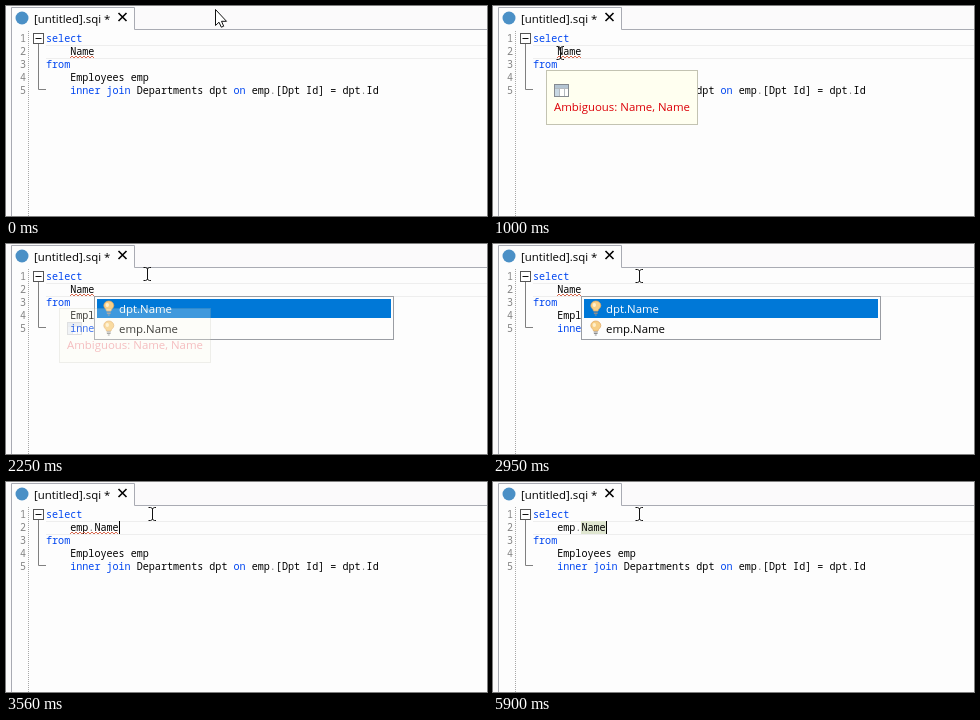
Write an HTML page that moves like this. It is 481 px wide and 210 px high and loops after 6.2 s.

```html
<!DOCTYPE html>
<html lang="en">
<head>
<meta charset="utf-8">
<title>Resolving an ambiguous column</title>
<style>
html, body { margin: 0; width: 100%; height: 100%; overflow: hidden; background: #fdfdfd; }
svg { display: block; width: 481px; height: 210px; }
text { white-space: pre; }
.code { font: 500 10.08px "Noto Sans Mono", "DejaVu Sans Mono", monospace; fill: #000; }
.ui { font: 11.41px "Open Sans", "Noto Sans", sans-serif; fill: #000; }
.kw { fill: #0046f0; }
.op { fill: #777; }
.num { fill: #858585; }
.wave { fill: none; stroke: #d2583c; stroke-width: .9; }

.anim { animation: 6200ms step-end infinite; }
#before { animation-name: before; }
#after { animation-name: after; }
#afterWave { animation-name: afterWave; }
#mark { animation-name: mark; }
#caretOld { animation-name: caretOld; }
#caretNew { animation-name: caretNew; }
#menu { animation-name: menu; }
#first { animation-name: first; }
#second { animation-name: second; }
#tip { animation-name: tip; }
#arrow { animation-name: arrow; }
#beam { stroke: #111; animation-name: beam, beamColor; }

@keyframes before { 0% { opacity: 1 } 57.41%, 100% { opacity: 0 } }
@keyframes after { 0% { opacity: 0 } 57.41%, 100% { opacity: 1 } }
@keyframes afterWave { 0% { opacity: 1 } 61.12%, 100% { opacity: 0 } }
@keyframes mark { 0% { opacity: 0 } 61.12%, 100% { opacity: 1 } }
@keyframes caretOld {
  0%, 12.41%, 29.83%, 47.58%, 57.41%, 100% { opacity: 0 }
  3.7%, 20.96%, 38.7%, 54.99% { opacity: 1 }
}
@keyframes caretNew {
  0%, 69.99%, 86.29% { opacity: 0 }
  57.41%, 78.87%, 95.16%, 100% { opacity: 1 }
}
@keyframes menu { 0%, 57.41%, 100% { opacity: 0 } 34.83% { opacity: 1 } }
@keyframes first { 0% { opacity: 1 } 51.29%, 100% { opacity: 0 } }
@keyframes second { 0% { opacity: 0 } 51.29%, 100% { opacity: 1 } }
@keyframes tip {
  0% { opacity: 0; transform: translate(59px, 57px) }
  13.54% { opacity: 1; transform: translate(59px, 57px) }
  14.83% { opacity: 1; transform: translate(53px, 64px) }
  33.54% { opacity: .8; transform: translate(53px, 64px) }
  34.83% { opacity: .5; transform: translate(53px, 64px) }
  36.29% { opacity: .25; transform: translate(53px, 64px) }
  37.41% { opacity: .1; transform: translate(53px, 64px) }
  38.7%, 100% { opacity: 0; transform: translate(53px, 64px) }
}
@keyframes arrow {
  0% { opacity: 1; transform: translate(209px, 3px) }
  9.83% { opacity: 1; transform: translate(194px, 8px) }
  11.12%, 100% { opacity: 0; transform: translate(194px, 8px) }
}
@keyframes beam {
  0% { opacity: 0; transform: translate(134px, 30px) }
  11.12% { opacity: 1; transform: translate(134px, 30px) }
  12.41% { opacity: 1; transform: translate(78px, 42px) }
  13.54% { opacity: 1; transform: translate(54px, 47px) }
  14.83% { opacity: 1; transform: translate(59px, 47px) }
  16.12% { opacity: 1; transform: translate(67px, 47px) }
  17.41% { opacity: 1; transform: translate(75px, 48px) }
  18.54% { opacity: 1; transform: translate(79px, 48px) }
  19.83% { opacity: 1; transform: translate(80px, 48px) }
  28.7% { opacity: 1; transform: translate(81px, 47px) }
  29.83% { opacity: 1; transform: translate(81px, 46px) }
  33.54% { opacity: 1; transform: translate(100px, 41px) }
  34.83% { opacity: 1; transform: translate(126px, 33px) }
  36.29% { opacity: 1; transform: translate(141px, 30px) }
  37.41% { opacity: 1; transform: translate(145px, 31px) }
  38.7% { opacity: 1; transform: translate(146px, 31px) }
  41.12%, 100% { opacity: 1; transform: translate(146px, 32px) }
}
@keyframes beamColor { 0%, 14.83%, 100% { stroke: #111 } 13.54% { stroke: #d8101c } }
</style>
</head>
<body>
<svg viewBox="0 0 481 210" xmlns="http://www.w3.org/2000/svg">
  <defs>
    <g id="bulb">
      <path d="M3.5 10C3.5 8 .8 7.2 .8 4.6A5 4.6 0 0 1 10.800 4.600C10.800 7.200 8 8 8 10Z" fill="#f8cf86" stroke="#dfa660" stroke-width=".7"/>
      <ellipse cx="4.3" cy="4" rx="1.7" ry="2.1" fill="#fff0cc"/>
      <path d="M3.7 11H7.8M3.9 12.5H7.6M4.8 14H6.7" stroke="#8d8d8d"/>
    </g>
  </defs>

  <!-- tab strip and editor frame -->
  <rect width="481" height="24" fill="#fbfafb"/>
  <rect width="5" height="210" fill="#fbfafb"/>
  <rect x="6" y="2" width="122" height="208" fill="#fdfdfd"/>
  <path d="M5.5 210V1.5H128.5V23.5H481" fill="none" stroke="#a9abb3"/>
  <circle cx="16" cy="12" r="6.5" fill="#4b90c6"/>
  <text class="ui" x="28" y="17">[untitled].sqi *</text>
  <path d="M112.5 7L120.5 15M120.5 7L112.5 15" stroke="#000" stroke-width="1.6"/>

  <!-- gutter -->
  <g class="code">
    <text class="num" x="14" y="36">1</text>
    <text class="num" x="14" y="49">2</text>
    <text class="num" x="14" y="62">3</text>
    <text class="num" x="14" y="75">4</text>
    <text class="num" x="14" y="88">5</text>
  </g>
  <path d="M22.5 25V210" stroke="#a8a8a8" stroke-dasharray="1 1"/>
  <path d="M32.5 38V83.5H40" fill="none" stroke="#808080"/>
  <rect x="27.5" y="27.5" width="10" height="10" fill="#fff" stroke="#555"/>
  <path d="M29.5 32.5H35.5" stroke="#111"/>

  <!-- code -->
  <path d="M481 39.5H40M40 52.5H481" stroke="#eee"/>
  <rect id="mark" class="anim" x="88" y="39" width="25" height="13" fill="#dfe6d0"/>
  <g class="code">
    <text class="kw" x="40" y="36">select</text>
    <text class="kw" x="40" y="62">from</text>
    <text x="64.2" y="75">Employees emp</text>
    <text x="64.2" y="88"><tspan class="kw">inner join</tspan> Departments dpt <tspan class="kw">on</tspan> emp<tspan class="op">.</tspan>[Dpt Id] = dpt<tspan class="op">.</tspan>Id</text>
    <g id="before" class="anim">
      <text x="64.2" y="49">Name</text>
      <path class="wave" d="M64 52l2-2 2 2 2-2 2 2 2-2 2 2 2-2 2 2 2-2 2 2 2-2 2 2"/>
    </g>
    <g id="after" class="anim">
      <text x="64.2" y="49">emp<tspan class="op">.</tspan>Name</text>
      <path id="afterWave" class="wave anim" d="M64 52l2-2 2 2 2-2 2 2 2-2 2 2 2-2 2 2 2-2 2 2 2-2 2 2 2-2 2 2 2-2 2 2 2-2 2 2 2-2 2 2 2-2 2 2 2-2 2 2"/>
    </g>
  </g>
  <rect id="caretOld" class="anim" x="88" y="39" width="1" height="13"/>
  <rect id="caretNew" class="anim" x="113" y="39" width="1" height="13"/>

  <!-- suggestions -->
  <g id="menu" class="anim">
    <rect x="88.5" y="52.5" width="299" height="43" fill="#fdfdfd" stroke="#9a9da3"/>
    <g id="first" class="anim">
      <rect x="91" y="55" width="294" height="19" fill="#0078d7"/>
      <text class="ui" x="113" y="69" style="fill:#fff">dpt.Name</text>
      <text class="ui" x="113" y="89">emp.Name</text>
    </g>
    <g id="second" class="anim">
      <rect x="91" y="75" width="294" height="18" fill="#0078d7"/>
      <text class="ui" x="113" y="69">dpt.Name</text>
      <text class="ui" x="113" y="89" style="fill:#fff">emp.Name</text>
    </g>
    <use href="#bulb" x="97" y="57"/>
    <use href="#bulb" x="97" y="77"/>
  </g>

  <!-- error tooltip -->
  <g id="tip" class="anim">
    <rect x=".5" y=".5" width="151" height="54" fill="#fffff0" stroke="#c3c3b2"/>
    <rect x="8.5" y="14.5" width="14" height="12" fill="#fff" stroke="#858a90"/>
    <rect x="9" y="15" width="13" height="3" fill="#b4c4d2"/>
    <rect x="9" y="18" width="4" height="8" fill="#c9d8e4"/>
    <path d="M9 18.5H22M13.5 18V26M18.5 18V26" stroke="#b4bac0"/>
    <text class="ui" x="8" y="41" style="fill:#dc0008">Ambiguous: Name, Name</text>
  </g>

  <!-- pointers -->
  <path id="arrow" class="anim" d="M.5 .5V16.500L4 13.200L6.300 18.200L8.700 17.200L6.500 12.300H11.500Z" fill="#fff" stroke="#111"/>
  <path id="beam" class="anim" d="M-3.5-6.5H-1.5L.5-5.5L2.5-6.5H4M.5-5.5V5.5M-3.5 6.5H-1.5L.5 5.5L2.5 6.5H4" fill="none"/>
</svg>
</body>
</html>
```
